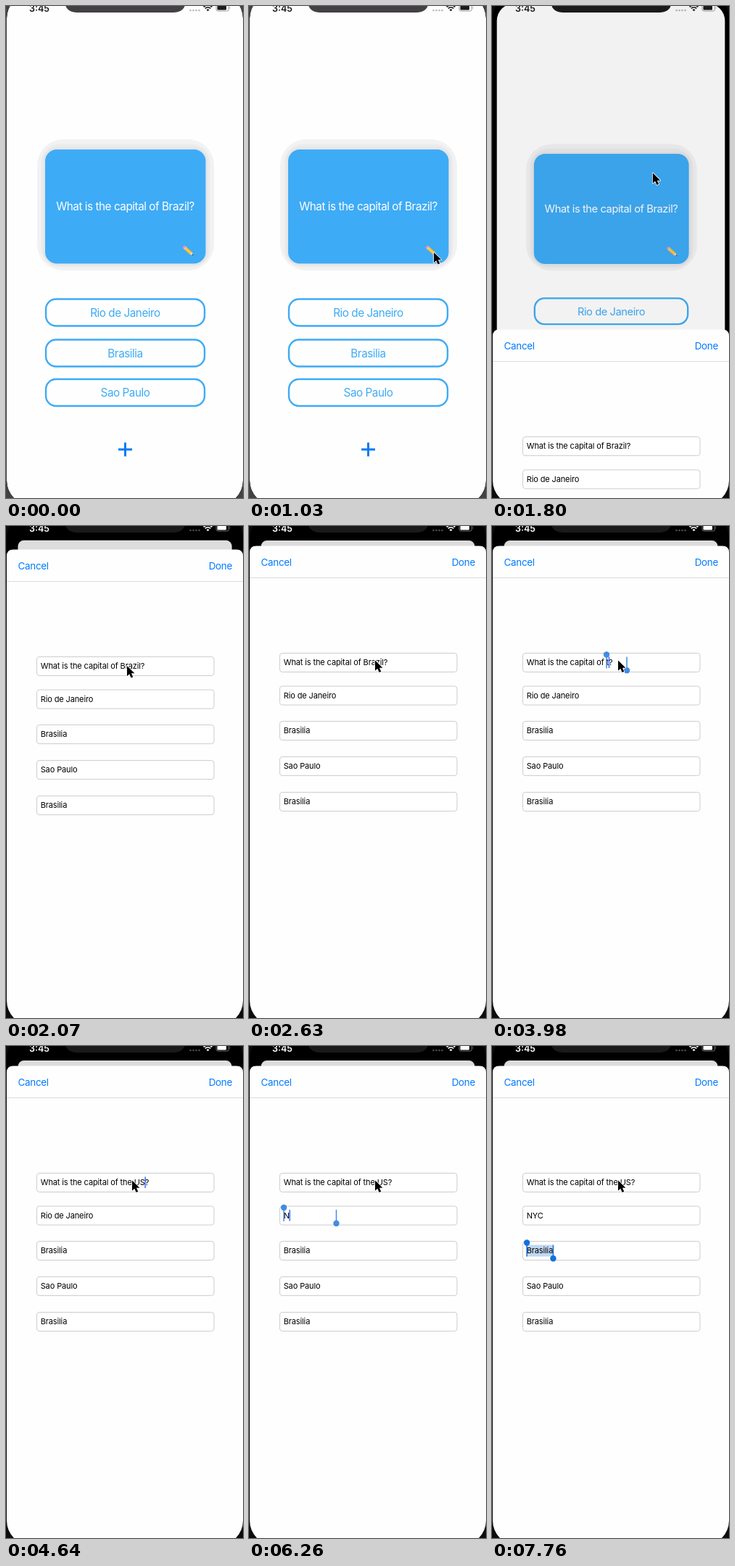
These frames come from a looping animation (327 by 679 pixels, 7.99 s). An HTML page:

```html
<!DOCTYPE html>
<html lang="en">
<head>
<meta charset="utf-8">
<title>Flashcard editor</title>
<style>
  html, body { margin: 0; width: 100%; height: 100%; overflow: hidden; background: #1b1b1b; }
  svg { display: block; width: 100%; height: 100%; }
  text { font-family: Inter, Roboto, sans-serif; white-space: pre; }
  .big { font-size: 15.27px; letter-spacing: -.03em; text-anchor: middle; }
  .nav { font-size: 13.4px; letter-spacing: -.02em; fill: #007aff; }
  .entry { font-size: 11px; letter-spacing: -.011em; fill: #000; }
  .menu { font-size: 11px; text-anchor: middle; fill: #fff; }
</style>
</head>
<body>
<svg id="stage" viewBox="0 0 327 679" xmlns="http://www.w3.org/2000/svg">
  <defs>
    <clipPath id="screen"><rect x="1" y="-17" width="326" height="706" rx="34"/></clipPath>
  </defs>
  <rect id="bezel" width="327" height="679"/>
  <g clip-path="url(#screen)">
    <rect width="327" height="679"/>
    <g id="home">
      <rect id="page" x="1" y="-17" width="326" height="706" fill="#fefefe"/>
      <rect x="43" y="184" width="244" height="181" rx="36" fill="#f2f2f2"/>
      <rect x="48.5" y="190.5" width="233" height="170" rx="26" fill="#ebebeb"/>
      <rect x="51.5" y="195" width="227" height="163" rx="19" fill="#e3e6e8"/>
      <rect x="54" y="198" width="221.500" height="157.500" rx="16" fill="#3eabf6"/>
      <text class="big" x="164.500" y="282.300" fill="#fff">What is the capital of Brazil?</text>
      <g transform="translate(245 332) rotate(42)">
        <path d="M0-2.300H2V2.300H0Q-1.500 0 0-2.300Z" fill="#ef8f95"/>
        <path d="M2-2.300H4V2.300H2Z" fill="#c9d0d4"/>
        <path d="M4-2.300H13.500V2.300H4Z" fill="#f7b52c"/>
        <path d="M4-.8H13.500V.8H4Z" fill="#fdd25a"/>
        <path d="M13.500-2.300 18 0 13.500 2.300Z" fill="#f3d9ac"/>
        <path d="M16.300-.9 18.500 0 16.300.9Z" fill="#333"/>
      </g>
      <g id="answers"></g>
      <path d="M155 612H174M164.500 602.500V621.500" stroke="#0a7af5" stroke-width="3"/>
      <rect id="dim" x="0" y="-18" width="328" height="708"/>
    </g>
    <g id="status">
      <text x="46" y="7.500" font-size="12.500" font-weight="600" text-anchor="middle">3:45</text>
      <g opacity=".3">
        <circle cx="254.500" cy="6" r="1.300"/><circle cx="258.500" cy="6" r="1.300"/>
        <circle cx="262.500" cy="6" r="1.300"/><circle cx="266.500" cy="6" r="1.300"/>
      </g>
      <path d="M276.500 5.200 278.500 7.300 280.500 5.200A3 3 0 0 0 276.500 5.200Z"/>
      <path d="M274.700 3.400A5.500 5.500 0 0 1 282.300 3.400M272.700 1.300A8.300 8.300 0 0 1 284.300 1.300" fill="none" stroke="currentColor" stroke-width="1.700"/>
      <rect x="290" y="-2" width="17.500" height="9" rx="2.600" fill="none" stroke="currentColor" opacity=".4"/>
      <rect x="291.500" y="-.5" width="12.500" height="6" rx="1.300"/>
      <path d="M308.700 1V4.200Q310.300 2.600 308.700 1Z" opacity=".45"/>
    </g>
    <g id="sheet">
      <path d="M1 720V9Q1 0 10 0H318Q327 0 327 9V720Z" fill="#fefefe"/>
      <path d="M1 44H327" stroke="#dcdcdc"/>
      <text class="nav" x="16.500" y="27">Cancel</text>
      <text class="nav" x="312" y="27" text-anchor="end">Done</text>
      <g id="boxes"></g>
      <rect id="mark" height="16" fill="#bfd8f2"/>
      <g id="entries"></g>
      <g id="handles" fill="#1570dc">
        <g id="left"><rect x="-.75" y="-8" width="1.500" height="16"/><circle cy="-11" r="4.200"/></g>
        <g id="right"><rect x="-.75" y="-8" width="1.500" height="16"/><circle cy="10.700" r="4.200"/></g>
      </g>
      <rect id="caret" width="1.500" height="15.500" fill="#3d6df5"/>
      <text id="ruler" class="entry" visibility="hidden"></text>
    </g>
    <g id="menu">
      <path id="bubble" d="M14 138.500H316Q320 138.500 320 142.500V163Q320 167 316 167H180L172.500 174.300 165 167H14Q10 167 10 163V142.500Q10 138.500 14 138.500Z" fill="#2b2b2b"/>
      <g id="labels"></g>
    </g>
  </g>
  <path id="notch" d="M82-1C84 5 89 9 98 9H231C240 9 245 5 247-1Z"/>
  <path id="cursor" d="M0 0V14.300L3.300 11.300 5.600 16.600 8.300 15.400 6 10.300H10.400Z" fill="#000" stroke="#fff" stroke-width="1.600" stroke-linejoin="round" paint-order="stroke"/>
</svg>
<script>
const LOOP = 7990;
const BLUE = '#3eabf6';
const PREFIX = 'What is the capital of ';
const TYPE_Q = [3980, 4100, 4220, 4340, 4580, 4640];
const TYPE_A = [6260, 6440, 6560];
const ROWS = [148, 193.5, 242, 291, 340];
const TEXT_X = 47.7;

// time, x, y of the pointer tip
const POINTER = [
  [500, 330, 319], [1030, 255, 340], [1560, 255, 340], [1800, 222, 230.5],
  [2070, 167, 193], [2330, 153, 190], [2390, 153, 190], [2630, 174, 185.5]
];

const $ = id => document.getElementById(id);
const clamp = v => Math.max(0, Math.min(1, v));
const span = (t, a, b) => clamp((t - a) / (b - a));
const easeOut = v => 1 - (1 - v) ** 2;
const mix = (a, b, p) => a + (b - a) * p;
const typed = (word, times, t) => word.slice(0, times.filter(k => t >= k).length);

function set(el, attrs) {
  for (const key in attrs) el.setAttribute(key, attrs[key]);
  return el;
}

function add(parent, tag, attrs, text = '') {
  const el = set(document.createElementNS('http://www.w3.org/2000/svg', tag), attrs);
  el.textContent = text;
  $(parent).append(el);
  return el;
}

[['Rio de Janeiro', 423], ['Brasilia', 479], ['Sao Paulo', 533.5]].forEach(([name, y]) => {
  add('answers', 'rect', { x: 55, y: y - 18.5, width: 219, height: 37, rx: 14,
    fill: 'none', stroke: BLUE, 'stroke-width': 2.4 });
  add('answers', 'text', { class: 'big', x: 164.5, y: y + 5.5, fill: BLUE }, name);
});

const entries = ROWS.map((y, i) => {
  add('boxes', 'rect', { x: 42.5, y, width: 244.5, height: 26, rx: 3.5, fill: '#fff', stroke: '#cdcdcd' });
  return add('entries', 'text', { class: 'entry', x: TEXT_X, y: y + 16.5 },
    ['', '', 'Brasilia', 'Sao Paulo', 'Brasilia'][i]);
});

[['Cut', 32.5], ['Copy', 81.5], ['Replace…', 147], ['Look Up', 219.5], ['Share…', 286.5]]
  .forEach(([name, x]) => add('labels', 'text', { class: 'menu', x, y: 157 }, name));

function endOf(str) {
  $('ruler').textContent = str;
  return TEXT_X + (str ? $('ruler').getComputedTextLength() : 0);
}

function pointerAt(t) {
  let i = POINTER.findIndex(k => k[0] > t);
  if (i === 0) return POINTER[0].slice(1);
  if (i < 0) return POINTER[POINTER.length - 1].slice(1);
  const [t0, x0, y0] = POINTER[i - 1], [t1, x1, y1] = POINTER[i];
  let p = span(t, t0, t1);
  if (i === 1 || i === 7) p = easeOut(p);
  return [mix(x0, x1, p), mix(y0, y1, p)];
}

function drawHome(t, p) {
  const bezel = t < 1350 ? '#434143' : t < 1410 ? '#2c2b2c' : '#1a1a1a';
  set($('bezel'), { fill: p > 0 ? '#0c0c0c' : bezel });
  set($('notch'), { fill: bezel });
  const scale = mix(1, .905, p);
  set($('home'), { transform: `translate(164.5 ${336 + 3.5 * p}) scale(${scale}) translate(-164.5 -336)` });
  set($('page'), { rx: mix(34, 9, p) });
  set($('dim'), { opacity: .13 * p });
  const ink = p > .6 ? '#fff' : '#1b1b1b';
  set($('status'), { fill: ink, color: ink });
}

function drawSelection(t) {
  // row, start text, selected text, shown at, settled at, replaced at
  const picks = [
    [0, PREFIX, 'Brazil', 2870, 3110, 3980],
    [1, '', 'Rio de Janeiro', 5540, 5960, 6260],
    [2, '', 'Brasilia', 7400, 7760, LOOP]
  ];
  const pick = picks.find(k => t >= k[3] && t < k[5] + 120);
  set($('mark'), { visibility: pick && t < pick[5] ? 'visible' : 'hidden' });
  set($('handles'), { visibility: pick ? 'visible' : 'hidden' });
  if (!pick) return;
  const [row, before, word, shown, settled, gone] = pick;
  const y = ROWS[row] + 13, x0 = endOf(before), x1 = endOf(before + word);
  const grow = mix(.3, 1, easeOut(span(t, shown, settled)));
  set($('mark'), { x: x0, y: y - 8, width: x1 - x0 });
  set($('handles'), { opacity: t < gone ? 1 : .8 * (1 - span(t, gone, gone + 120)) });
  set($('left'), { transform: `translate(${x0 + .4} ${y}) scale(${grow})` });
  set($('right'), { transform: `translate(${x1 + .2} ${y}) scale(${grow})` });
}

function drawCaret(t, country, answer) {
  let row = -1, str = '';
  if (t >= 3980 && t < 4940) [row, str] = [0, PREFIX + country];
  else if ((t >= 4940 && t < 5540) || (t >= 6260 && t < 6860)) [row, str] = [1, answer];
  else if (t >= 6860 && t < 7400) [row, str] = [2, 'Brasilia'];
  set($('caret'), { visibility: row < 0 ? 'hidden' : 'visible' });
  if (row >= 0) set($('caret'), { x: endOf(str) - .4, y: ROWS[row] + 5 });
}

function draw(t) {
  // critically damped spring for the sheet
  const s = Math.max(0, t - 1740) * .021;
  const p = 1 - (1 + s) * Math.exp(-s);
  drawHome(t, p);
  set($('sheet'), { transform: `translate(0 ${mix(689, 27.5, p)})` });

  const country = t < 3980 ? 'Brazil' : typed('the US', TYPE_Q, t);
  const answer = t < 6260 ? 'Rio de Janeiro' : typed('NYC', TYPE_A, t);
  entries[0].textContent = PREFIX + country + '?';
  entries[1].textContent = answer;
  drawSelection(t);
  drawCaret(t, country, answer);

  const fade = t >= 3320 && t < 3980 ? span(t, 3230, 3432) : 0;
  set($('bubble'), { opacity: fade });
  set($('labels'), { opacity: fade ** 2 });

  set($('cursor'), {
    transform: `translate(${pointerAt(t)})`,
    visibility: t < 500 ? 'hidden' : 'visible'
  });
}

const start = performance.now();
function tick() {
  draw((performance.now() - start) % LOOP);
  requestAnimationFrame(tick);
}
tick();
</script>
</body>
</html>
```
